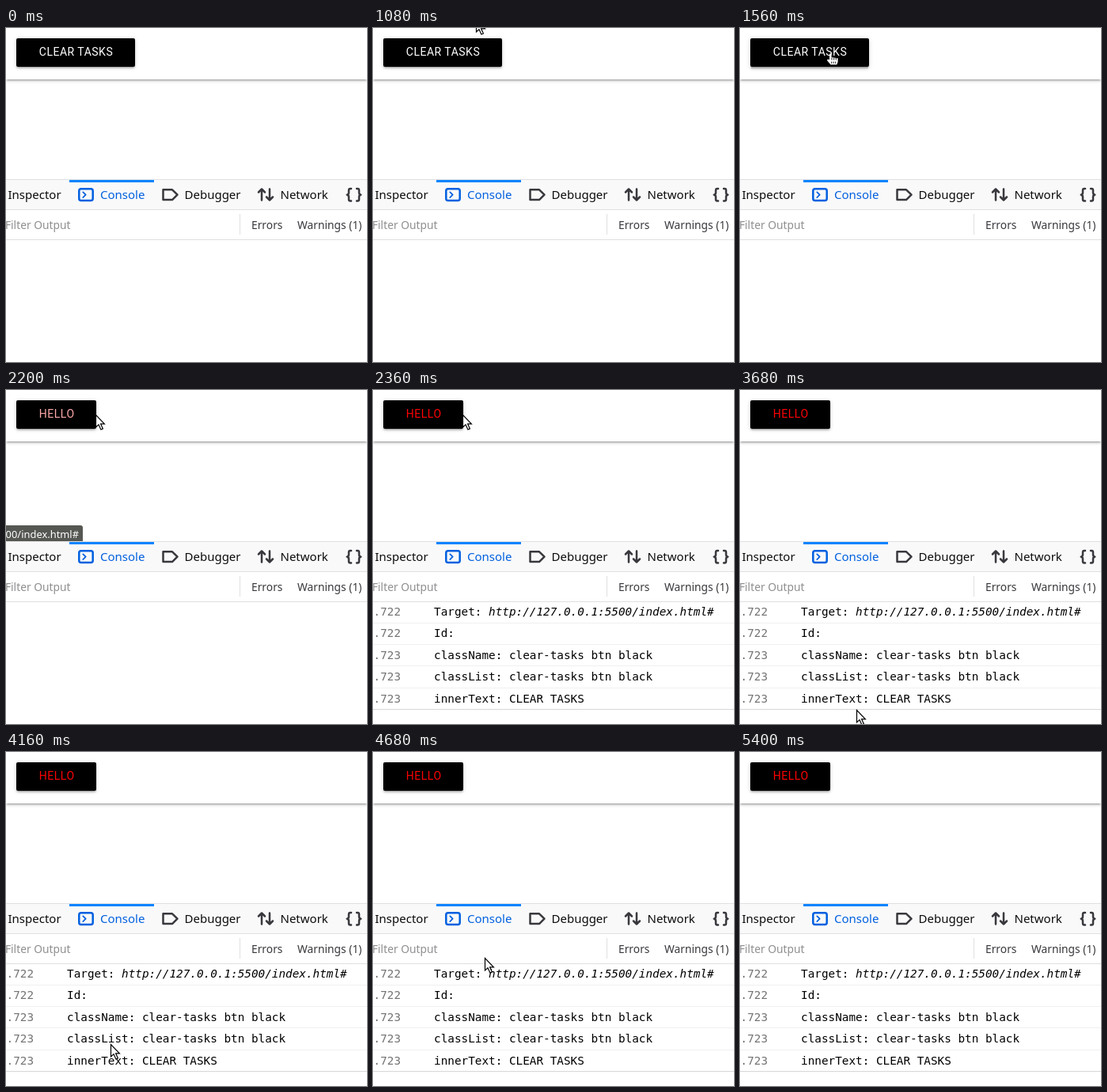
Write an HTML page that moves like this. It is 456 px wide and 422 px high and loops after 5.92 s.

```html
<!DOCTYPE html>
<html lang="en">
<head>
<meta charset="utf-8">
<title>Clear tasks</title>
<style>
  html, body { margin: 0; width: 100%; height: 100%; overflow: hidden; background: #fff; }
  #stage { position: absolute; inset: 0; overflow: hidden; contain: strict; }
  #nav, #button, svg { position: absolute; }
  #nav, #button { box-shadow: 0 2px 2px 0 #00000024, 0 3px 1px -2px #0000001f, 0 1px 5px 0 #00000033; }
  #nav { left: 0; top: 0; width: 100%; height: 65px; background: #fff; }
  #button {
    left: 13px; top: 13px; height: 36px; box-sizing: border-box; padding-left: 28.8px;
    border-radius: 2px; background: #000; white-space: nowrap;
    font: 14px/35px Roboto, sans-serif; letter-spacing: .5px;
  }
  #button.hover { box-shadow: 0 3px 3px 0 #00000024, 0 1px 7px 0 #0000001f, 0 3px 1px -1px #00000033; }
  svg { left: 0; top: 0; width: 100%; height: 100%; overflow: hidden; }
  text { font-family: "Noto Sans", sans-serif; white-space: pre; }
  .tab { font-size: 15px; fill: #0c0c0d; }
  .filter { font-size: 13.8px; fill: #38383d; }
  #log text { font: 14.33px "DejaVu Sans Mono", monospace; }
  .icon { fill: none; stroke: #38383d; stroke-width: 2.5; stroke-linejoin: round; stroke-linecap: round; }
</style>
</head>
<body>
<div id="stage">
  <div id="nav"></div>
  <div id="button"></div>
  <svg viewBox="0 0 456 422">
    <rect y="191" width="456" height="39" fill="#e0e0e2"/>
    <rect y="192" width="456" height="37" fill="#f9f9fa"/>
    <rect x="80" y="192" width="107" height="3" fill="#0a84ff"/>
    <rect y="267" width="456" height="1" fill="#e0e0e2"/>
    <rect x="295" y="235" width="1" height="26" fill="#e0e0e2"/>

    <g class="tab">
      <text x="2.5" y="216">Inspector</text>
      <text x="119" y="216" fill="#0060df">Console</text>
      <text x="225.5" y="216">Debugger</text>
      <text x="346.5" y="216">Network</text>
    </g>
    <g class="icon">
      <g stroke="#0060df">
        <rect x="92.3" y="203.3" width="17.4" height="14.8" rx="2.5"/>
        <path d="M97.3 207.3l3.4 3.4-3.4 3.4" stroke-width="1.7"/>
      </g>
      <path d="M198.5 204.3h11.5l6.5 6.4-6.5 6.4h-11.5z"/>
      <path id="up" d="M323 217.5v-14m-4 4l4-4 4 4"/>
      <use href="#up" transform="rotate(180 328 210.5)"/>
      <path id="brace" d="M436 203h-1q-2 0-2 2v3q0 2.5-2.3 2.7 2.3.2 2.3 2.7v3q0 2 2 2h1"/>
      <use href="#brace" transform="matrix(-1 0 0 1 879 0)"/>
    </g>
    <g class="filter">
      <text x="81.5" y="254" text-anchor="end" fill="#8f8f92">Filter Output</text>
      <text x="310" y="254">Errors</text>
      <text x="368" y="254">Warnings (1)</text>
    </g>

    <g id="log"></g>

    <g id="status">
      <path d="M0 171h94q3 0 3 3v17H0z" fill="#555753"/>
      <text x="92" y="187" font-size="12.9" fill="#fff" text-anchor="end">127.0.0.1:5500/index.html#</text>
    </g>

    <g id="cursor">
      <path id="arrow" d="M.5.5v15.5l3.5-3.2 2.9 6.2 2.5-1.1-2.8-6.1h4.8z" fill="#fff" stroke="#000" stroke-width="1.2"/>
      <g id="hand">
        <path d="M0 9V2.5q0-1.3 1.3-1.3t1.3 1.3V6l8 1.2V12L9.3 15.3H1.5L-2.8 10.2q-.6-1.8 1-1.7z" fill="#fff"/>
        <path d="M3 6.5v3m2.7-3v3m2.6-3v3M2.6 11.5v2.3m2.4-2.3v2.3m2.4-2.3v2.3" stroke="#000" stroke-width=".9"/>
      </g>
    </g>
  </svg>
</div>
<script>
const LOOP = 5920, STEP = 40, CLICK = 2120, LOGGED = 2240, ROW = 27.4;
const $ = id => document.getElementById(id);
const ramp = (t, start, length) => Math.max(0, Math.min(1, (t - start) / length));

const rows = [
  ['.722', 'Target: ', 'http://127.0.0.1:5500/index.html#'],
  ['.722', 'Id:'],
  ['.723', 'className: clear-tasks btn black'],
  ['.723', 'classList: clear-tasks btn black'],
  ['.723', 'innerText: CLEAR TASKS'],
];
$('log').innerHTML = rows.map(([time, label, link = ''], i) => {
  const y = Math.round(285 + i * ROW);
  const line = Math.floor(294 + i * ROW);
  return `<text x=".5" y="${y}" fill="#737373">${time}</text>
    <text x="77" y="${y}">${label}<tspan font-style="italic">${link}</tspan></text>
    <rect y="${line}" width="456" height="1" fill="${i < 4 ? '#f0f0f1' : '#d7d7db'}"/>`;
}).join('');

// Turning points of the pointer as [ms, x, y]; it rests between strokes.
const strokes = [
  [[920, 134, -22], [1560, 113, 31]],
  [[2720, 113, 31], [2960, 172, 110], [3160, 92, 236], [3240, 119, 266], [3640, 140, 400],
   [3920, 191, 372], [4160, 132, 369], [4520, 192, 348], [5040, -14, 25]],
  [[5200, -13, -18], [5320, 2, -15], [5440, -2, -26]],
];

// Catmull-Rom curve from b to c
function spline(a, b, c, d, u) {
  return b + u / 2 * (c - a + u * (2 * a - 5 * b + 4 * c - d + u * (3 * (b - c) + d - a)));
}

function pointerAt(t) {
  const points = strokes.findLast(s => s[0][0] <= t) || strokes[0];
  const i = Math.max(0, points.findLastIndex(p => p[0] <= t));
  const [a, b, c, d] = [i - 1, i, i + 1, i + 2]
    .map(k => points[Math.max(0, Math.min(points.length - 1, k))]);
  const u = ramp(t, b[0], c[0] - b[0] || Infinity);
  return [1, 2].map(k => Math.round(spline(a[k], b[k], c[k], d[k], u)));
}

function draw(now) {
  const t = Math.floor(now % LOOP / STEP) * STEP;
  const clicked = t >= CLICK;
  const [x, y] = pointerAt(t);
  const over = !clicked && y >= 13;
  const pale = 255 * (1 - ramp(t, CLICK, 240));
  const button = $('button');

  button.textContent = clicked ? 'HELLO' : 'CLEAR TASKS';
  button.style.width = clicked ? '101px' : '150px';
  button.style.color = `rgb(255 ${pale} ${pale})`;
  button.className = over ? 'hover' : '';

  $('log').style.display = t >= LOGGED ? '' : 'none';
  $('status').style.opacity = ramp(t, 1680, 120) * (1 - ramp(t, 2200, 120));
  $('cursor').setAttribute('transform', `translate(${x} ${y})`);
  $('arrow').style.display = over ? 'none' : '';
  $('hand').style.display = over ? '' : 'none';
}

const start = performance.now();
function tick() {
  draw(performance.now() - start);
  requestAnimationFrame(tick);
}
tick();
</script>
</body>
</html>
```
